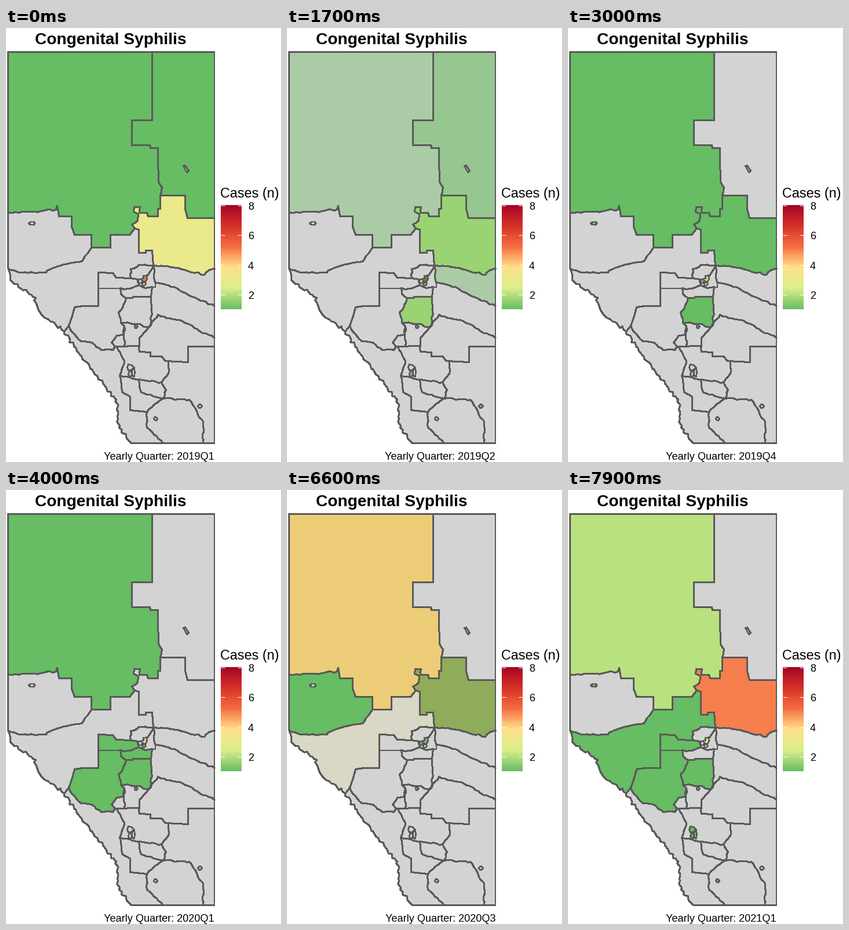
A matplotlib script for the animation above (8 s loop, 475 by 750 pixels).

```python
import numpy as np
import matplotlib.pyplot as plt
from matplotlib.animation import FuncAnimation
from matplotlib.colors import to_rgb
from matplotlib.patches import Polygon

W, H, DPI = 475, 750, 100
STEP = 100  # ms per frame
plt.rcParams["font.family"] = "Liberation Sans"
LINE = "#595959"
EMPTY = "#D3D3D3"
STOPS = ["#66BD63", "#D9EF8B", "#FEE08B", "#F46D43", "#D73027", "#A50026"]
rng = np.random.default_rng(7)

# ---- colour: everything is blended in CIE Lab
RGB_XYZ = np.array([[.4124, .3576, .1805], [.2126, .7152, .0722], [.0193, .1192, .9505]])
WHITE = RGB_XYZ.sum(axis=1)


def to_lab(color):
    c = np.array(to_rgb(color))
    lin = np.where(c > .04045, ((c + .055) / 1.055) ** 2.4, c / 12.92)
    f = np.cbrt(RGB_XYZ @ lin / WHITE)
    return np.array([116 * f[1] - 16, 500 * (f[0] - f[1]), 200 * (f[1] - f[2])])


def to_srgb(lab):
    fy = (lab[0] + 16) / 116
    f = np.array([fy + lab[1] / 500, fy, fy - lab[2] / 200])
    lin = np.clip(np.linalg.solve(RGB_XYZ, f ** 3 * WHITE), 0, 1)
    return np.clip(np.where(lin > .0031308, 1.055 * lin ** (1 / 2.4) - .055, lin * 12.92), 0, 1)


STOPS_LAB = np.array([to_lab(c) for c in STOPS])
EMPTY_LAB = to_lab(EMPTY)


def case_lab(n):
    if not n:
        return EMPTY_LAB
    at = np.linspace(1, 8, len(STOPS))
    return np.array([np.interp(n, at, channel) for channel in STOPS_LAB.T])


# ---- geometry helpers
def survey(*points):
    """Straight surveyed border."""
    return np.array(points, float)


def river(*points, rough=1.5, piece=5):
    """Natural border: key points joined by a ragged line."""
    out = [points[0]]
    for a, b in zip(survey(*points), survey(*points)[1:]):
        count = max(int(np.hypot(*(b - a)) / piece), 1)
        for k in range(1, count):
            out.append(a + (b - a) * k / count + rng.uniform(-rough, rough, 2))
        out.append(b)
    return np.array(out)


def town(x, y, rx, ry):
    angle = np.arange(6) * np.pi / 3
    size = rng.uniform(.8, 1.15, 6)
    return np.column_stack([x + rx * size * np.cos(angle), y + ry * size * np.sin(angle)])


def join(*parts):
    return np.vstack(parts)


def back(border):
    return border[::-1]


# ---- points where three or more borders meet
LEFT, TOP, RIGHT, BOTTOM = 3, 41, 359.5, 717
NORTH_EAST = (266, 289)
LAKE = (222, 346)
PEACE = (147, 379)
PASS = (100, 524)
HILLS = (108, 514)
FORK = (159, 449)
METRO_W, METRO_S, METRO_E = (215, 432), (229, 444), (254, 410)
BELT_W, BELT_E = (197, 449), (252, 447)
PLAIN_W, PLAIN_E, PLAIN_S = (207, 466), (250, 464), (198, 509)
BAND = (257, 439)
FOOT = (184, 556)
BOW, CROSS, OLDMAN, GAP = (228, 607), (280, 578), (271, 640), (243, 663)

# ---- borders
nw_ne = join(survey((252, TOP), (252, 159), (217, 159), (217, 202), (248, 202), (249, 207),
                    (262, 207)), river((262, 240), (264, 268), (269, 275), NORTH_EAST, rough=.8))
ne_east = survey(NORTH_EAST, (309, 289), (309, 312), (313, 328), (RIGHT, 328))
nw_east = join(survey(NORTH_EAST, (266, 312), (262, 312), (262, 325), (245, 325), (243, 319)),
               river((230, 319), (231, 309), (221, 309), (220, 317), (228, 321), (227, 332),
                     (217, 339), LAKE, rough=.8))
nw_west = survey(LAKE, (213, 357), (180, 357), (180, 379), PEACE)
nw_peace = join(survey(PEACE, (147, 357), (118, 357), (113, 343), (113, 325), (91, 325), (88, 307)),
                river((86, 313), (60, 316), (22, 319), (LEFT, 318)))
peace_west = river(PEACE, (130, 403), (99, 408), (70, 419), (69, 422), (22, 422), (LEFT, 415),
                   rough=.9)
west_east = survey(LAKE, (229, 348), (229, 388), (241, 388), (241, 384), (252, 384), METRO_E)
east_band = river(METRO_E, (274, 411), (299, 415), (342, 426), (350, 418), (RIGHT, 415))
band_side = river(METRO_E, BAND)
band_south = river(BAND, (290, 447), (325, 465), (RIGHT, 480))
rockies_north = river((LEFT, 415), (10, 438), (46, 464), (66, 500), PASS, rough=3)
rockies_south = river(PASS, (122, 558), (158, 602), (190, 642), (195, 690), (216, BOTTOM), rough=3)
west_hills = survey(PASS, HILLS)
west_foot = survey(HILLS, (114, 497), (118, 482), (132, 480), (159, 480), FORK)
west_strip = survey(FORK, (159, 422), (184, 423), (190, 431), METRO_W)
west_metro = river(METRO_W, (215, 416), (229, 409), METRO_E)
strip_metro = survey(METRO_W, (228, 434), METRO_S)
strip_south = river(METRO_S, (213, 450), (203, 451), BELT_W, rough=.8)
strip_foot = survey(BELT_W, FORK)
foot_belt = river(BELT_W, (198, 459), PLAIN_W)
foot_plain = river(PLAIN_W, (201, 483), (194, 491), PLAIN_S, rough=1)
foot_south = river(PLAIN_S, (204, 515), (202, 530), (191, 531), (182, 543), (188, 550), FOOT, rough=1)
foot_hills = river(FOOT, (164, 556), (148, 543), (129, 541), (113, 524), HILLS, rough=1)
belt_plain = survey(PLAIN_W, (218, 466), (219, 464), PLAIN_E)
belt_east = survey(PLAIN_E, BELT_E)
belt_metro = survey(BELT_E, (240, 449), METRO_S)
plain_rest = river(PLAIN_E, (251, 489), (250, 508), (244, 517), (231, 511), PLAIN_S)
metro_split = river(METRO_E, (243, 428), rough=1)
metro_low = survey(BELT_E, (257, 447), BAND)

southern = [
    river((246, 517), (262, 495), (304, 506), (330, 520), (RIGHT, 535)),
    river((246, 517), (230, 535), (230, 559)),
    survey((230, 559), (249, 560), (249, 567), (268, 567), (275, 575), (314, 577), (314, 550),
           (RIGHT, 550)),
    survey((188, 550), (230, 549)),
    river((191, 550), (204, 575), (196, 600), BOW, (268, 612), (280, 597), CROSS),
    river((196, 600), (200, 628), (214, 637), rough=1),
    survey((214, 637), (214, 660), GAP),
    river(BOW, (233, 629), OLDMAN, (257, 649), GAP),
    river(GAP, (243, 690), (271, BOTTOM)),
    river((268, 612), (276, 625), OLDMAN, (316, 642), (340, 680), (340, BOTTOM)),
    river((204, 515), (204, 549)),
]

corner_nw, corner_ne, corner_se = ([p] for p in ((LEFT, TOP), (RIGHT, TOP), (RIGHT, BOTTOM)))
outline = join(corner_nw, corner_ne, corner_se, back(rockies_south), back(rockies_north))

lands = {
    "nw": join(corner_nw, nw_ne, nw_east, nw_west, nw_peace),
    "ne": join(nw_ne, ne_east, corner_ne),
    "east": join(back(nw_east), ne_east, back(east_band), back(west_east)),
    "peace": join(nw_peace, back(peace_west)),
    "west": join(nw_west, peace_west, rockies_north, west_hills, west_foot, west_strip,
                 west_metro, back(west_east)),
    "band": join(east_band, back(band_south), back(band_side)),
    "strip": join(west_strip, strip_metro, strip_south, strip_foot),
    "foot": join(west_foot, back(strip_foot), foot_belt, foot_plain, foot_south, foot_hills),
    "belt": join(foot_belt, belt_plain, belt_east, belt_metro, strip_south),
    "plain": join(belt_plain, plain_rest, back(foot_plain)),
    "metro": join(west_metro, metro_split, back(strip_metro)[1:]),
    "metro_east": join(metro_split, [(240, 449)], metro_low, back(band_side)),
}
towns = {
    "core": survey((234, 433), (237, 432), (237, 428), (242, 427), (243, 433), (241, 438), (235, 437)),
    "core_west": town(230.5, 437, 4.5, 4),
    "core_south": town(238, 441.5, 3.5, 3.5),
    "bow_north": town(214, 586, 6, 5.5),
    "bow_south": town(214, 597, 3, 6),
    "bow_side": town(219.5, 595, 2.5, 8),
    "north_town": town(44.5, 337, 5.5, 3),
    "ne_town": survey((306, 238), (309, 237), (315, 246), (312, 249)),
    "south_town": town(258, 675, 3, 3.5),
    "east_town": town(334.5, 653, 3.5, 3.5),
    "mid_town": town(224, 515.5, 3, 3.5),
}
borders = [nw_ne, ne_east, nw_east, nw_west, nw_peace, peace_west, west_east, east_band, band_side,
           band_south, west_hills, west_foot, west_strip, west_metro, strip_metro, strip_south,
           strip_foot, foot_belt, foot_plain, foot_south, foot_hills, belt_plain, belt_east,
           belt_metro, plain_rest, metro_split, metro_low, *southern]

# ---- cases per quarter from 2019Q1 on; regions left out have none
cases = [
    dict(nw=1, ne=1, east=3, core=5),
    dict(ne=1, east=2, core=8, core_west=2, core_south=1, plain=2, bow_south=1, east_town=1),
    dict(nw=1, east=1, band=1, plain=1, core=1, core_west=4, core_south=1),
    dict(nw=1, east=1, plain=1, core=4, core_west=1, north_town=1),
    dict(nw=1, strip=1, foot=1, belt=1, plain=1, core=4, core_south=1),
    dict(peace=1, east=1, foot=1, plain=1, metro=1, metro_east=1, core=6, core_west=3, bow_south=1),
    dict(nw=3, peace=1, east=1, core=1, core_west=1),
    dict(nw=6, peace=1, east=6, west=3, core=2, core_west=1),
    dict(nw=2, east=5, west=1, strip=1, foot=1, plain=1, core=3, bow_north=1, bow_south=1,
         bow_side=1, south_town=1, north_town=1),
]
TURNS = [min(600 + 1000 * i, 7500) for i in range(len(cases) - 1)]  # start of each change
CHANGE_STEPS = 5

# ---- stage
fig = plt.figure(figsize=(W / DPI, H / DPI), dpi=DPI, facecolor="white")
ax = fig.add_axes([0, 0, 1, 1])
ax.axis("off")


def px(size):
    return size * 72 / DPI


def label(x, y, text, size, **kw):
    return ax.text(x, y, text, fontsize=px(size), va="baseline", **kw)


def stroke(border, width=2):
    ax.plot(*border.T, color=LINE, lw=px(width), solid_joinstyle="round", antialiased=False)


def fill(shape):
    return ax.add_patch(Polygon(shape, fc=EMPTY, ec="none", antialiased=False))


fill(outline)
patches = {name: fill(shape) for name, shape in {**lands, **towns}.items()}
for border in borders:
    stroke(border)
for shape in towns.values():
    stroke(join(shape, shape[:1]), 1.5)
stroke(join(outline, outline[:1]))

label(180.5, 28, "Congenital Syphilis", 28.1, weight="bold", ha="center")
label(370, 293, "Cases (n)", 23.4)
ramp = [[to_srgb(case_lab(n))] for n in np.linspace(8, 1, 180)]
ax.imshow(ramp, extent=(370.5, 406.5, 486, 306), aspect="auto", interpolation="nearest", zorder=1)
for n in (8, 6, 4, 2):
    y = 306.7 + (8 - n) * 25.6
    for x in (370.5, 399.3):
        ax.plot([x, x + 7.2], [y, y], color="white", lw=px(1), solid_capstyle="butt")
    label(417.5, y + 7, str(n), 18)
caption = label(359.5, 745, "", 18.1, ha="right")
ax.set(xlim=(-.5, W - .5), ylim=(H - .5, -.5))


def draw(frame):
    time = frame * STEP
    begun = sum(time >= t for t in TURNS)
    last = max(begun - 1, 0)
    steps = (time - TURNS[last]) / STEP + 1
    mix = np.clip(steps / CHANGE_STEPS, 0, 1) if begun else 0
    for name, patch in patches.items():
        a, b = (case_lab(cases[i].get(name)) for i in (last, last + 1))
        patch.set_facecolor(to_srgb(a + (b - a) * mix))
    shown = last + (mix > .5)
    caption.set_text(f"Yearly Quarter: {2019 + shown // 4}Q{shown % 4 + 1}")
    return [*patches.values(), caption]


anim = FuncAnimation(fig, draw, frames=80, interval=STEP, repeat=True, repeat_delay=0, blit=False)
plt.show()
```
